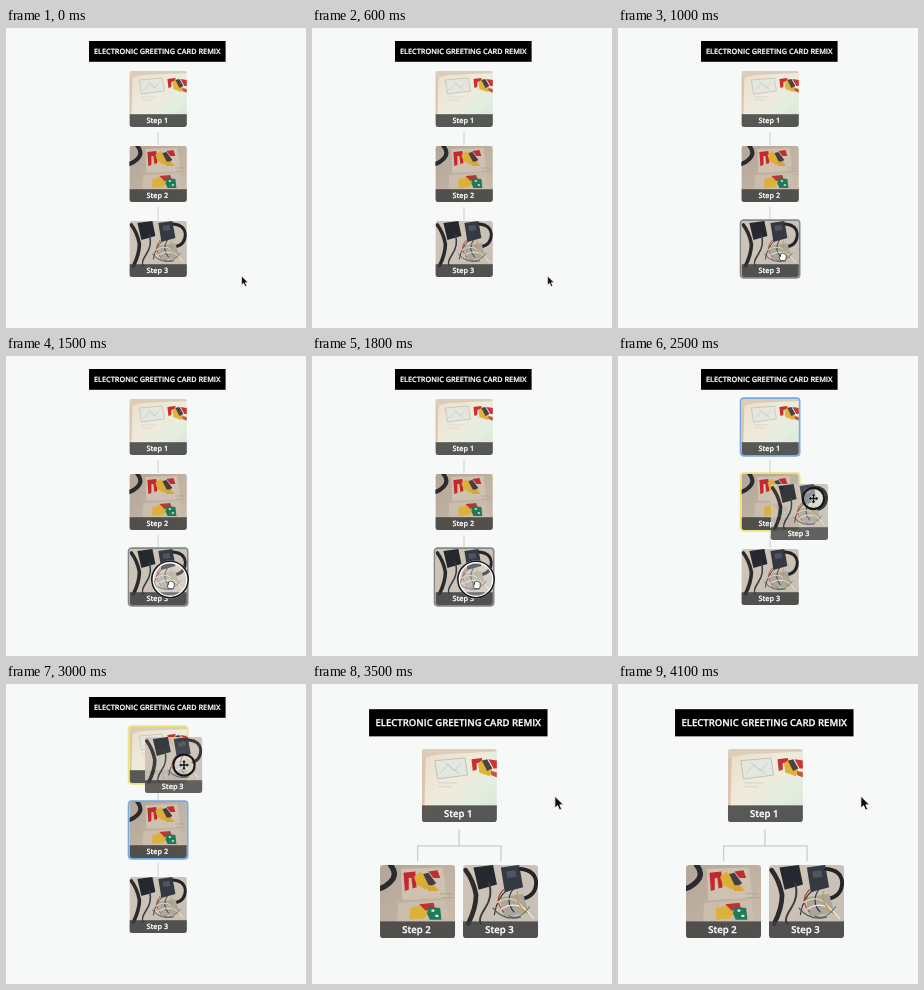
Recreate the animation shown at these times as an HTML page. Size 300 by 300 pixels, loop 4500 ms.

```html
<!DOCTYPE html>
<html lang="en">
<head>
<meta charset="utf-8">
<title>Card steps</title>
<style>
html, body { margin: 0; width: 100%; height: 100%; overflow: hidden; background: #f7f9f8; }
svg { display: block; width: 100vw; height: 100vh; }
text {
  font: 600 7.3px "Open Sans", sans-serif;
  fill: #fff; stroke: #fff; stroke-width: .22;
  text-anchor: middle; text-rendering: geometricPrecision;
}
.line { fill: none; stroke: #cbcece; }
.wire { fill: none; stroke-linecap: round; }
.band { fill: #3c3c3c; fill-opacity: .84; }
.frame { fill: none; stroke-width: 1.7; }
.gray { stroke: #868888; }
.blue { stroke: #78a8e0; }
.yellow { stroke: #ebe37c; }

/* Each scene is shown for a slice of the 4500 ms loop, starting at --at. */
.scene { visibility: hidden; animation: half 4500ms var(--at, 0ms) step-end infinite; }
.full { animation-name: full; }
.build { animation-name: build; }
@keyframes half { 0% { visibility: visible } 11.1111%, 100% { visibility: hidden } }
@keyframes full { 0% { visibility: visible } 22.2222%, 100% { visibility: hidden } }
@keyframes build { 0% { visibility: visible } 77.7778%, 100% { visibility: hidden } }
</style>
</head>
<body>
<svg viewBox="0 0 300 300">
<defs>
  <clipPath id="round"><rect width="57.4" height="56" rx="2.4"/></clipPath>
  <linearGradient id="paper" x1="0" y1="0" x2="1" y2="1">
    <stop offset="0" stop-color="#eaddc8"/>
    <stop offset=".4" stop-color="#f0eadb"/>
    <stop offset=".7" stop-color="#e3eee0"/>
    <stop offset="1" stop-color="#d5e2d3"/>
  </linearGradient>
  <linearGradient id="desk" x1="0" y1="0" x2="1" y2="1">
    <stop offset="0" stop-color="#b3a597"/>
    <stop offset="1" stop-color="#cdbfae"/>
  </linearGradient>
  <linearGradient id="table" x1="0" y1="0" x2="1" y2="1">
    <stop offset="0" stop-color="#d0c5b7"/>
    <stop offset="1" stop-color="#c5beb5"/>
  </linearGradient>

  <g id="card1" clip-path="url(#round)">
    <rect width="58" height="57" fill="url(#paper)"/>
    <path d="M0 0H58V2L14 4L0 7Z" fill="#dccdb9"/>
    <path d="M0 7L3 6L2 44H0Z" fill="#dcc5ae"/>
    <path d="M10 9L33 7L35 20L12 23Z" fill="#e4e7de" stroke="#b3b8b3" stroke-width=".6"/>
    <path d="M14 19L20 12L25 17L30 11M18 11L29 19M13 26H27M13 29H23" class="wire" stroke="#bfc4bd" stroke-width=".5"/>
    <path d="M38 8L46 7V10L42 11V16L39 17Z" fill="#c92e32"/>
    <path d="M43 11L47 8L54 17L52 21L44 18Z" fill="#e0b23a"/>
    <path d="M46 9L50 8L54 15L50 17Z" fill="#4b4246"/>
    <path d="M51 8L58 9V15L55 15Z" fill="#cf3434"/>
    <path d="M53 17L58 18V22L53 20Z" fill="#c8553a"/>
    <rect y="43.2" width="58" height="14" class="band"/>
    <text x="27.9" y="52">Step 1</text>
  </g>

  <g id="card2" clip-path="url(#round)">
    <rect width="58" height="57" fill="url(#desk)"/>
    <path d="M16 3L48 2L51 25L17 27Z" fill="#cec1b0"/>
    <path d="M14 29L50 27L53 44H13Z" fill="#cabdad"/>
    <path d="M8 0Q14 7 8 13Q4 17 0 18" class="wire" stroke="#2b2b2f" stroke-width="4"/>
    <path d="M18 6L27 5L28 17L25 18L24 10L22 10L22 19L19 20Z" fill="#c2282e"/>
    <path d="M26 9L31 5L38 13L35 19L28 15Z" fill="#dcae34"/>
    <path d="M33 7L37 6L43 14L38 17Z" fill="#453d42"/>
    <path d="M37 5L44 4L46 10L41 10Z" fill="#c32c30"/>
    <path d="M34 15L42 16L45 20L37 20Z" fill="#d6a636"/>
    <path d="M23 33L31 31L38 37L33 41L23 42Z" fill="#dab13a"/>
    <path d="M30 30L41 29L42 33L35 35Z" fill="#bf3430"/>
    <path d="M37 32L46 33L47 42L38 42L36 37Z" fill="#217957"/>
    <path d="M40 35H41M43 39H44" class="wire" stroke="#e2ece0" stroke-width="1.6"/>
    <path d="M46 22H55M47 25H56" class="wire" stroke="#a99d90" stroke-width=".6"/>
    <rect y="43.2" width="58" height="14" class="band"/>
    <text x="27.9" y="52">Step 2</text>
  </g>

  <g id="card3" clip-path="url(#round)">
    <rect width="58" height="57" fill="url(#table)"/>
    <path d="M8 2L23 0L26 15L12 19Z" fill="#25292f"/>
    <path d="M2 4Q8 12 10 23Q10 33 4 45" class="wire" stroke="#2b2b2e" stroke-width="3.6"/>
    <path d="M20 14Q23 24 17 33T14 45" class="wire" stroke="#3a3a3f" stroke-width="1.5"/>
    <path d="M29 2L43 0L46 17L32 21Z" fill="#343943"/>
    <path d="M33 5L40 4L41 9L34 10Z" fill="#4e555f"/>
    <path d="M44 3Q55 4 56 13Q56 24 45 26" class="wire" stroke="#252529" stroke-width="3"/>
    <path d="M28 25L46 22L50 36L31 40Z" fill="#aaa69d"/>
    <g class="wire" stroke-width=".9">
      <path d="M34 19Q26 25 24 38M38 19Q32 28 39 36" stroke="#38343a"/>
      <path d="M31 19Q23 27 31 36" stroke="#b1443c"/>
      <path d="M26 29Q39 21 47 34" stroke="#e5d7ac"/>
      <path d="M29 34Q43 25 54 41" stroke="#f0ece2"/>
      <path d="M42 20Q39 29 49 37" stroke="#c39a36"/>
      <path d="M35 39Q43 43 51 32" stroke="#627b66"/>
      <path d="M23 33Q31 43 44 40" stroke="#55555b"/>
    </g>
    <rect y="43.2" width="58" height="14" class="band"/>
    <text x="27.9" y="52">Step 3</text>
  </g>

  <g id="heading">
    <rect x="83" y="13" width="136.6" height="20.8"/>
    <text x="151.3" y="26">ELECTRONIC GREETING CARD REMIX</text>
  </g>
  <rect id="frame" x="-.85" y="-.85" width="59.1" height="57.7" rx="3" class="frame"/>
  <path id="arrow" d="M0 0V9L2.1 7.2L3.6 10.6L5.2 9.9L3.8 6.6H6.6Z" fill="#111" stroke="#fff" stroke-width=".6"/>
  <path id="hand" d="M-2.6 3.6L-4 0L-2.5-.4L-2.5-3L-1.1-3.4L-.4-4L.8-3.4L2-3.2L3.2-2.2L3.2 1.4L2.2 3.8Z" fill="#fff" stroke="#333" stroke-width=".8"/>
  <g id="move">
    <circle r="10.6" fill="#fff" fill-opacity=".38" stroke="#161616" stroke-width="2"/>
    <path d="M0-5L2-2.7H.7V-.7H2.7V-2L5 0L2.7 2V.7H.7V2.7H2L0 5L-2 2.7H-.7V.7H-2.7V2L-5 0L-2.7-2V-.7H-.7V-2.7H-2Z" fill="#111" stroke="#fff" stroke-width=".9" paint-order="stroke"/>
  </g>
</defs>

<rect width="300" height="300" fill="#f7f9f8"/>

<g class="scene build">
  <use href="#heading"/>
  <path d="M152 104V117M152 179V192" class="line"/>
  <use href="#card1" x="123.4" y="43"/>
  <use href="#card2" x="123.4" y="118"/>
  <use href="#card3" x="123.4" y="193"/>
</g>

<g class="scene full">
  <use href="#arrow" x="235.5" y="248"/>
</g>

<g class="scene" style="--at: 1000ms">
  <use href="#frame" x="123.4" y="193" class="gray"/>
  <use href="#hand" x="165" y="229"/>
</g>

<g class="scene" style="--at: 1500ms">
  <use href="#frame" x="123.4" y="193" class="gray"/>
  <circle cx="164" cy="223.5" r="17.6" fill="#fff" fill-opacity=".22" stroke="#fff" stroke-width="3"/>
  <circle cx="164" cy="223.5" r="18.2" fill="none" stroke="#191919" stroke-width="1.6"/>
  <use href="#hand" x="165" y="229"/>
</g>

<g class="scene" style="--at: 2000ms">
  <use href="#frame" x="123.4" y="43" class="blue"/>
  <use href="#frame" x="123.4" y="118" class="blue"/>
  <use href="#card3" x="141.4" y="164.4" opacity=".8"/>
  <use href="#move" x="184" y="188.5"/>
</g>

<g class="scene" style="--at: 2500ms">
  <use href="#frame" x="123.4" y="43" class="blue"/>
  <use href="#frame" x="123.4" y="118" class="yellow"/>
  <use href="#card3" x="152.6" y="128" opacity=".9"/>
  <use href="#move" x="195.5" y="142.5"/>
</g>

<g class="scene" style="--at: 3000ms">
  <use href="#frame" x="123.4" y="43" class="yellow"/>
  <use href="#frame" x="123.4" y="118" class="blue"/>
  <use href="#card3" x="138.8" y="53" opacity=".9"/>
  <use href="#move" x="178" y="81"/>
</g>

<g class="scene full" style="--at: 3500ms">
  <g transform="translate(-51.4 8.2) scale(1.3066)">
    <use href="#heading"/>
    <path d="M151.9 104.8V117.6M120.2 129.2V117.6H184V129.2" class="line"/>
    <use href="#card1" x="123.4" y="43.4"/>
    <use href="#card2" x="91.4" y="132.2"/>
    <use href="#card3" x="154.9" y="132.2"/>
    <use href="#arrow" x="225.2" y="79.6"/>
  </g>
</g>
</svg>
</body>
</html>
```
